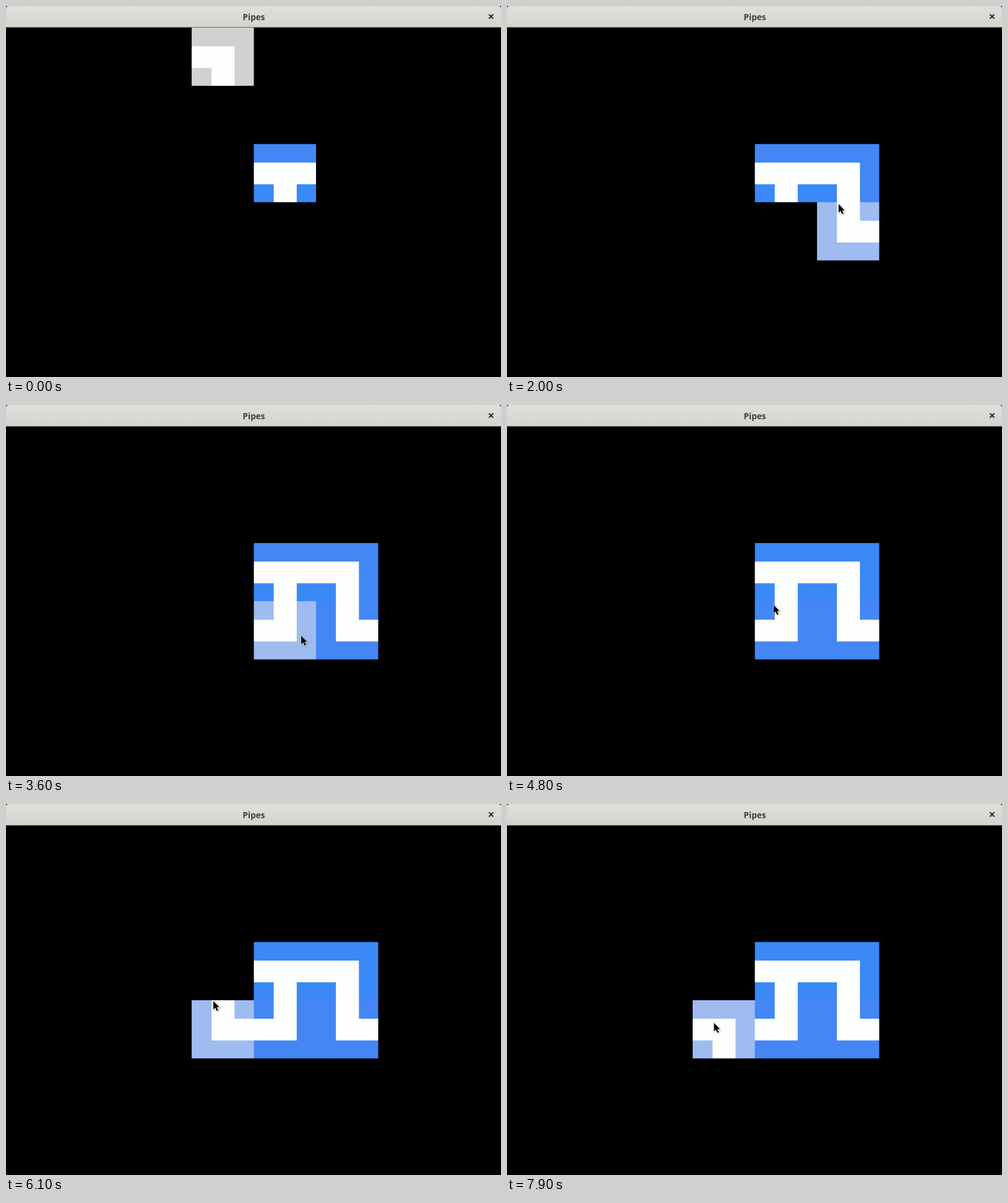
An HTML page with a canvas for the animation above (8000 ms loop, 800 by 600 pixels).

```html
<!DOCTYPE html>
<html lang="en">
<head>
<meta charset="utf-8">
<title>Pipes</title>
<style>
  html, body { margin: 0; width: 100%; height: 100%; overflow: hidden; background: #000; }
  canvas { display: block; }
</style>
</head>
<body>
<canvas id="stage" width="800" height="600"></canvas>
<script>
const ctx = document.getElementById('stage').getContext('2d');
const LOOP = 8000, STEP = 100;
const BLUE = '#4487f4', AZURE = '#3a89f7', PALE = '#9fbcf1', GREY = '#d0d2d0', WHITE = '#fdfffe';

// The board is drawn in whole pixels, then scaled softly onto the stage.
const W = 100, H = 94, LEFT = -1.5, TOP = 35, SX = 1.005, SY = 1.001;
const board = Object.assign(document.createElement('canvas'), { width: 8 * W, height: 6 * H });
const pen = board.getContext('2d');

const pieces = [
  { c: 4, r: 2, open: 'LRB', at: 0 },
  { c: 5, r: 2, open: 'LB', at: 1900 },
  { c: 5, r: 3, open: 'TR', at: 3200 },
  { c: 4, r: 3, open: 'TL', at: 4100 }
];
// how the last piece is turned while in hand
const turns = [['RB', 0], ['TR', 6000], ['TL', 6500], ['LB', 7200]];

// pointer glides: begin, end, x, y
const glides = [
  [800, 1100, 447, 238], [1100, 1600, 537, 303], [1900, 2400, 534, 338],
  [2500, 3000, 535, 379], [3500, 3800, 452, 370], [4000, 4600, 500, 330],
  [4700, 5400, 312, 310.5], [5500, 6300, 335, 318.3], [6400, 7000, 334, 349],
  [7700, 7900, 334, 353.5]
];

function tile(c, r, open, color, lower = color) {
  const fill = (x, y, w, h, style) => {
    pen.fillStyle = style;
    pen.fillRect(c * W + x, r * H + y, w, h);
  };
  const has = side => open.includes(side);
  fill(0, 0, W, H, color);
  if (has('L')) fill(0, 65, 32, 29, lower);
  if (has('R')) fill(69, 65, 31, 29, lower);
  fill(32, 30, 37, 35, WHITE);
  if (has('L')) fill(0, 30, 32, 35, WHITE);
  if (has('R')) fill(69, 30, 31, 35, WHITE);
  if (has('T')) fill(32, 0, 37, 30, WHITE);
  if (has('B')) fill(32, 65, 37, 29, WHITE);
}

function pointerAt(t) {
  let x = 785, y = 125;
  for (const [begin, end, toX, toY] of glides) {
    const k = Math.min(1, Math.max(0, (t - begin) / (end - begin)));
    const ease = 1 - (1 - k) ** 3;
    x += (toX - x) * ease;
    y += (toY - y) * ease;
  }
  return [x, y];
}

const arrow = new Path2D('M.5 .5V14L3.7 11.2L6 16.4L8.2 15.4L6 10.4H10Z');

function pointer(x, y) {
  ctx.save();
  ctx.translate(x, y);
  ctx.shadowColor = 'rgba(0,0,0,.35)';
  ctx.shadowBlur = 3;
  ctx.shadowOffsetX = ctx.shadowOffsetY = 1;
  ctx.fillStyle = '#080808';
  ctx.strokeStyle = '#e4e4e4';
  ctx.lineWidth = 1.2;
  ctx.stroke(arrow);
  ctx.shadowColor = 'transparent';
  ctx.fill(arrow);
  ctx.restore();
}

function titleBar() {
  const shade = ctx.createLinearGradient(0, 0, 0, 34);
  shade.addColorStop(0, '#e0e0da');
  shade.addColorStop(1, '#d3d4ce');
  ctx.fillStyle = shade;
  ctx.beginPath();
  ctx.roundRect(0, 0, 800, 34.5, [4, 4, 0, 0]);
  ctx.fill();
  ctx.fillStyle = '#3d403e';
  ctx.font = 'bold 13.6px "Noto Sans", "Open Sans", sans-serif';
  ctx.textAlign = 'center';
  ctx.fillText('Pipes', 400.5, 22.5);
  ctx.strokeStyle = '#2b2d2c';
  ctx.lineWidth = 2;
  ctx.stroke(new Path2D('M780.5 13.5l7 7m0 -7l-7 7'));
}

function draw(t) {
  const seen = t >= 800;
  const [x, y] = seen ? pointerAt(t) : [330, 40];
  const col = Math.floor((x - LEFT) / (W * SX)), row = Math.floor((y - TOP) / (H * SY));
  const placed = pieces.filter(p => p.at <= t);

  pen.clearRect(0, 0, board.width, board.height);
  for (const { c, r, open } of placed) {
    const upper = r === 2;
    tile(c, r, open, upper && t >= 4300 ? AZURE : BLUE, upper ? AZURE : BLUE);
  }
  if (!placed.some(p => p.c === col && p.r === row)) {
    const next = pieces[placed.length];
    const open = next ? next.open : turns.findLast(([, at]) => at <= t)[0];
    tile(col, row, open, row < 2 ? GREY : PALE);
  }

  ctx.fillStyle = '#000';
  ctx.fillRect(0, 0, 800, 600);
  ctx.drawImage(board, LEFT, TOP, board.width * SX, board.height * SY);
  titleBar();
  if (seen) pointer(x, y);
}

const start = performance.now();
function frame() {
  const t = (performance.now() - start) % LOOP;
  draw(Math.floor(t / STEP) * STEP);
  requestAnimationFrame(frame);
}
frame();
</script>
</body>
</html>
```
